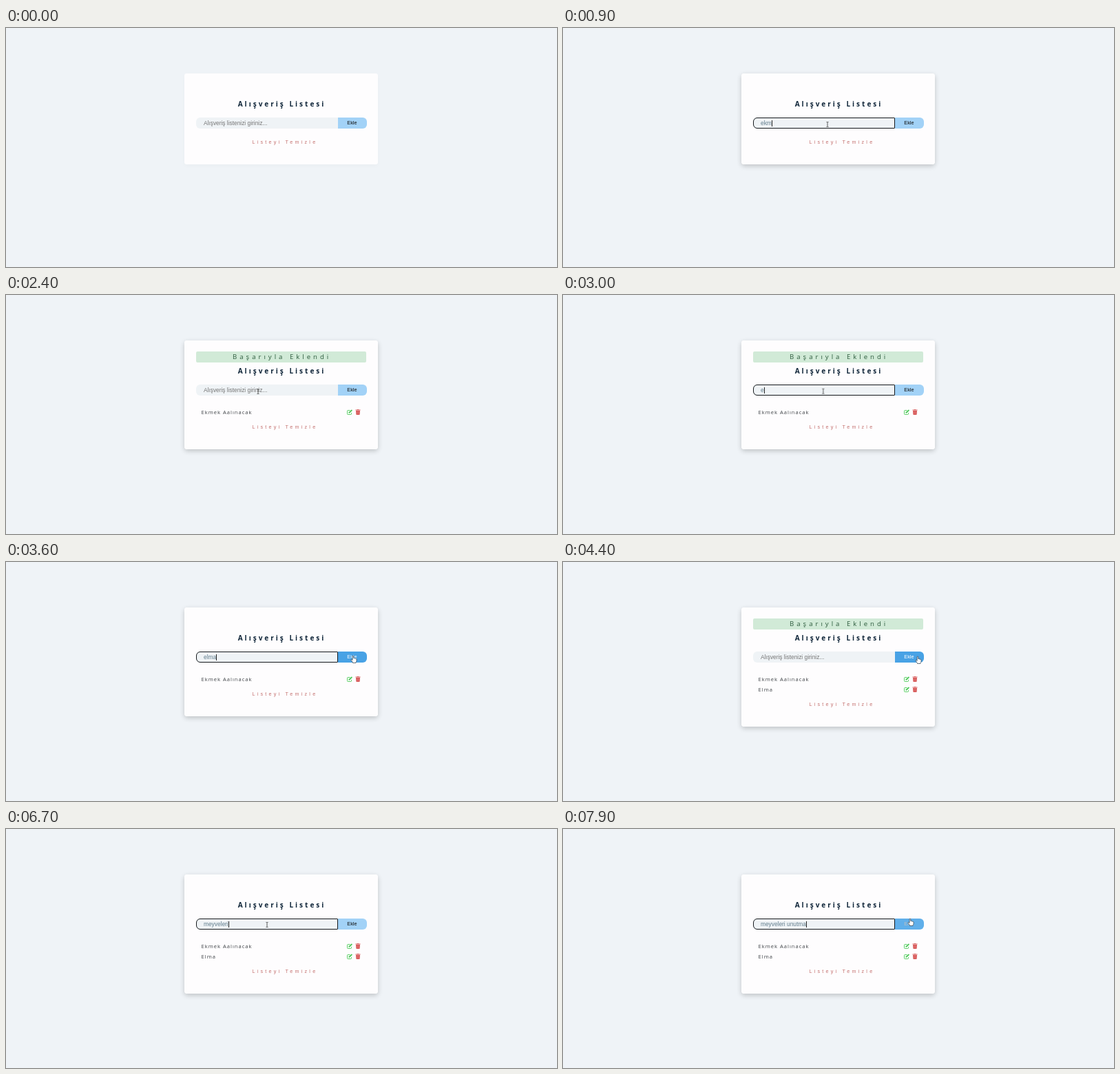
An HTML page for the animation above (8 s loop, 800 px wide and 347 px high).

```html
<!DOCTYPE html>
<html lang="tr">
<head>
<meta charset="utf-8">
<title>Alışveriş Listesi</title>
<style>
  html, body { margin: 0; width: 100%; height: 100%; overflow: hidden; background: #eff3f7; }
  body * { position: absolute; box-sizing: border-box; animation: 8s linear infinite; }
  .line { line-height: 16px; white-space: pre; font-family: "Open Sans", sans-serif; }
  .ui { font-family: "Liberation Sans", Arial, sans-serif; }
  .step { animation-timing-function: step-end; }

  #card { left: 259px; top: 65.5px; width: 281px; height: 132.5px; border-radius: 4px; background: #fefdfe;
          animation-name: grow; }
  #shade { inset: 0; border-radius: 4px; box-shadow: 0 2.5px 7.5px rgba(0, 0, 0, .2); animation-name: hover; }
  #fill { inset: 0; border-radius: 4px; background: #fefdfe; }

  #alert { left: 276px; top: 82px; width: 247px; height: 15.5px; border-radius: 2px; background: #d1ead7;
           animation-name: alert; }
  #alert .line { left: 53px; top: 0; font-size: 9.6px; letter-spacing: 4px; color: #2c5a3c; }
  #title { left: 336.7px; top: 102px; font-size: 10px; font-weight: 700; letter-spacing: 3px; color: #0e2438; }

  #field { left: 276px; top: 130px; width: 206px; height: 15.5px; border-radius: 6px 0 0 6px; background: #eff3f6;
           animation-name: autofill; }
  #ring { inset: -.5px 0 0 -.5px; border: 1px solid #15191c; border-radius: 6px 1px 1px 6px; animation-name: focus; }
  #field .line { left: 11px; top: 0; font-size: 8.35px; }
  #hint { color: #757575; }
  #entry { color: #617d8c; animation-name: ink; }
  #entry * { position: static; }
  #typo { text-decoration: underline wavy #d8413c .5px; text-underline-offset: 1px; }
  #caret { display: inline-block; width: .6px; height: 9px; vertical-align: -2px; background: #222; animation-name: focus; }

  #add { left: 482px; top: 130px; width: 41.5px; height: 15.5px; border-radius: 0 6px 6px 0;
         background: #a2d2f7; color: #111; animation-name: press; }
  #add .line { left: 13.3px; top: 0; font-size: 7.3px; }

  .item { left: 283.5px; width: 240px; height: 16px; }
  .item .line { left: 0; top: 0; font-size: 7.6px; letter-spacing: 1px; color: #3f4347; }
  .item svg { top: 4px; width: 8px; height: 8px; }
  #item1 { top: 162px; animation-name: first; }
  #item2 { top: 177px; animation-name: second; }
  #clear { left: 357.5px; top: 158px; font-size: 7.2px; letter-spacing: 3.22px; color: #c4706e; animation-name: drop; }

  #cursor { left: 0; top: 0; animation-name: travel; }
  #cursor svg { left: 0; top: 0; overflow: visible; width: 1px; height: 1px; }
  #arrow { animation-name: arrow; }
  #beam { animation-name: beam; }
  #hand { animation-name: hand; }

  @keyframes grow { 0% { height: 132.5px } 23.5% { height: 158px } 51%, 100% { height: 173.5px } }
  @keyframes drop { 0% { transform: none } 23.5% { transform: translateY(25.5px) } 51%, 100% { transform: translateY(41px) } }
  @keyframes first { 0% { visibility: hidden } 23.5%, 100% { visibility: visible } }
  @keyframes second { 0% { visibility: hidden } 51%, 100% { visibility: visible } }
  @keyframes hover { 0%, 4% { opacity: .12 } 8%, 100% { opacity: 1 } }
  @keyframes alert { 0%, 43.75%, 75%, 100% { visibility: hidden } 23.5%, 51% { visibility: visible } }
  @keyframes focus { 0%, 23.5%, 51% { visibility: hidden } 7%, 33%, 61%, 100% { visibility: visible } }
  @keyframes autofill { 0%, 23.5%, 100% { background: #eff3f6 } 16.1% { background: #e7f0f9 } }
  @keyframes ink { 0%, 23.5%, 100% { color: #617d8c } 16.1% { color: #1b1f22 } }
  @keyframes press {
    0%, 18.5%, 28.25%, 41.25%, 61.25%, 96% { background: #a2d2f7; color: #111 }
    22.25%, 24.5%, 45%, 57.5%, 99.75%, 100% { background: #48a2e5; color: #fff }
  }
  @keyframes travel {
    0%, 1% { transform: translate(420px, 255px); opacity: 0 }
    1.1% { transform: translate(420px, 255px); opacity: 1 }
    6.25%, 16% { transform: translate(384px, 140px) }
    19.5%, 24% { transform: translate(497px, 140px) }
    29.5%, 37% { transform: translate(366px, 140px) }
    43%, 51% { transform: translate(504px, 136px) }
    54%, 56% { transform: translate(515px, 137px) }
    61%, 95.25% { transform: translate(379px, 139px) }
    97.25%, 100% { transform: translate(504px, 130px); opacity: 1 }
  }
  @keyframes arrow { 0% { visibility: visible } 5.5%, 100% { visibility: hidden } }
  @keyframes beam {
    0%, 19%, 41.7%, 96.7%, 100% { visibility: hidden }
    5.5%, 24.7%, 57.5% { visibility: visible }
  }
  @keyframes hand {
    0%, 24.7%, 57.5% { visibility: hidden }
    19%, 41.7%, 96.7%, 100% { visibility: visible }
  }
</style>
</head>
<body>
  <svg width="0" height="0">
    <symbol id="edit" viewBox="0 0 16 16">
      <path d="M9 3H2.5Q1 3 1 4.500V13.500Q1 15 2.500 15H11.500Q13 15 13 13.500V10" fill="none" stroke="#5fd069" stroke-width="2"/>
      <path d="M5 11.500 5.400 8.600 12.500 1.500Q13.500 .6 14.500 1.500L15.200 2.200Q16 3.200 15.200 4.100L8 11.200Z" fill="#4ac956"/>
    </symbol>
    <symbol id="trash" viewBox="0 0 16 16">
      <path d="M1 1.200H5L6 0H10L11 1.200H15V3.200H1ZM2 4.200H14L13.300 14.500Q13.200 16 11.800 16H4.200Q2.800 16 2.700 14.500Z" fill="#d85a5a"/>
      <path d="M5.500 6.500V13.500M8 6.500V13.500M10.500 6.500V13.500" stroke="#e58c8c" stroke-width=".8"/>
    </symbol>
  </svg>

  <div id="card" class="step"><div id="shade"></div><div id="fill"></div></div>
  <div id="alert" class="step"><div class="line">Başarıyla Eklendi</div></div>
  <div id="title" class="line">Alışveriş Listesi</div>

  <div id="field" class="step">
    <div id="ring" class="step"></div>
    <div id="hint" class="line ui">Alışveriş listenizi giriniz...</div>
    <div id="entry" class="line ui step"><span id="typed"></span><span id="typo"></span><span id="caret" class="step"></span></div>
  </div>
  <div id="add"><div class="line ui">Ekle</div></div>

  <div id="item1" class="item step">
    <div class="line">Ekmek Aalınacak</div>
    <svg style="left:211.5px"><use href="#edit"/></svg><svg style="left:223px"><use href="#trash"/></svg>
  </div>
  <div id="item2" class="item step">
    <div class="line">Elma</div>
    <svg style="left:211.5px"><use href="#edit"/></svg><svg style="left:223px"><use href="#trash"/></svg>
  </div>
  <div id="clear" class="line ui step">Listeyi Temizle</div>

  <div id="cursor">
    <svg id="arrow" class="step"><path d="M0 0V8.500L2 6.700 3.300 9.600 4.600 9 3.300 6.200H6Z" fill="#111" stroke="#fff" stroke-width=".6"/></svg>
    <svg id="beam" class="step"><path d="M-1.500 -3.500H-.5L0 -3 .5 -3.500H1.500M0 -3V3M-1.500 3.500H-.5L0 3 .5 3.500H1.500" fill="none" stroke="#333" stroke-width=".8"/></svg>
    <svg id="hand" class="step"><path d="M-.9 .6Q0 -.6 .8 .6V3.700Q1.700 3.100 2.300 4 3.200 3.500 3.800 4.400 4.900 4.200 5 5.400V7.300Q4.900 8.600 4 9.600V10.500H-.6V9.600L-3 6.500Q-3.100 5.200 -1.900 5.500L-.9 6.500Z" fill="#fff" stroke="#2b3a48" stroke-width=".7" stroke-linejoin="round"/></svg>
  </div>

<script>
  const byId = id => document.getElementById(id);
  const every = (start, gap, count) => Array.from({ length: count }, (_, i) => start + gap * i);

  // Each entry: text, misspelt tail, keystroke times, time of submission.
  const entries = [
    { text: 'ekmek ', tail: 'aalınacak', keys: [...every(700, 100, 5), ...every(1290, 0, 10)], end: 1880 },
    { text: 'elma', tail: '', keys: every(2980, 110, 4), end: 4080 },
    { text: 'meyveleri unutma', tail: '',
      keys: [5190, 5290, 5470, 5590, 5690, 6380, 6390, 6490, ...every(6690, 100, 8)], end: 8000 }
  ];

  function draw(now) {
    const t = now % 8000;
    const { text, tail, keys } = entries.find(e => t < e.end);
    const count = keys.filter(k => k <= t).length;
    byId('typed').textContent = text.slice(0, count);
    byId('typo').textContent = tail.slice(0, Math.max(0, count - text.length));
    byId('hint').style.visibility = count ? 'hidden' : 'visible';
    requestAnimationFrame(draw);
  }
  requestAnimationFrame(draw);
</script>
</body>
</html>
```
